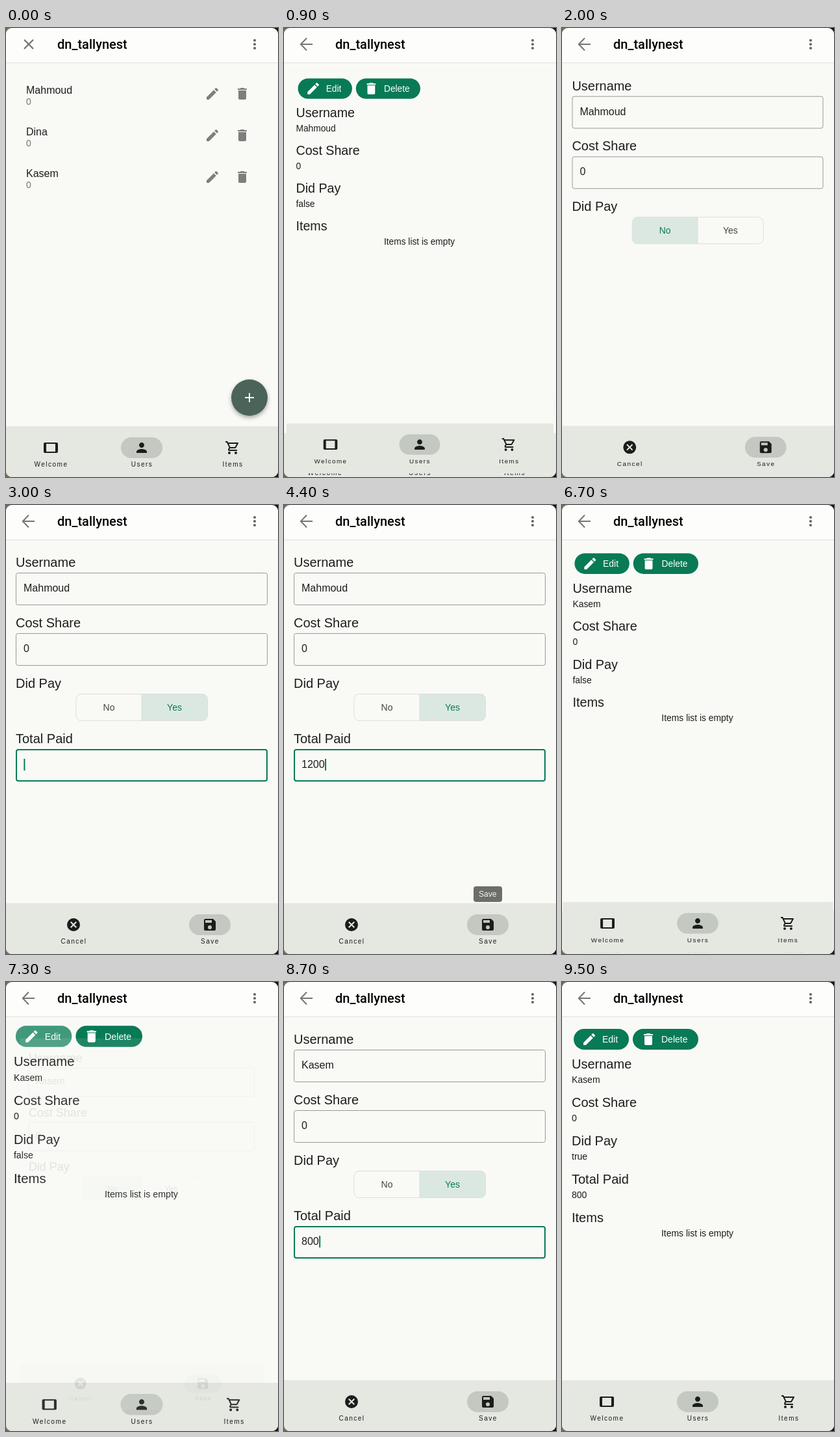
An HTML page that plays this animation: 419 by 690 pixels, repeating every 10 s.

```html
<!DOCTYPE html>
<html lang="en">
<head>
<meta charset="utf-8">
<title>Shared costs</title>
<style>
  html, body { margin: 0; width: 100%; height: 100%; overflow: hidden; background: linear-gradient(90deg, #6d735c, #111); }
  svg { display: block; width: 100%; height: 100%; border-radius: 9px; font-family: "Liberation Sans", Arial, sans-serif; }
</style>
</head>
<body>
<svg id="stage" viewBox="0 0 419 690"></svg>
<script>
const LOOP = 10000, TICK = 100, MOVE = 300;
const PAPER = '#f9faf6', INK = '#1b1d1b', GREEN = '#087a55', GREY = '#7d7f7d';
const TITLE = 'dn_tallynest';
const [FIRST, SECOND, THIRD] = ['Mahmoud', 'Dina', 'Kasem'];

const ICONS = {
  pen: 'M3 17.25V21h3.75L17.81 9.94l-3.75-3.75L3 17.25zM20.71 7.04a1 1 0 000-1.41l-2.34-2.34a1 1 0 00-1.41 0l-1.83 1.83 3.75 3.75 1.83-1.83z',
  bin: 'M6 19c0 1.1.9 2 2 2h8c1.1 0 2-.9 2-2V7H6v12zM19 4h-3.5l-1-1h-5l-1 1H5v2h14V4z',
  tablet: 'M21 4H3C1.9 4 1 4.9 1 6v12c0 1.1.9 2 2 2h18c1.1 0 2-.9 2-2V6c0-1.1-.9-2-2-2zm-2 14H5V6h14v12z',
  person: 'M12 12c2.21 0 4-1.79 4-4s-1.79-4-4-4-4 1.79-4 4 1.79 4 4 4zm0 2c-2.67 0-8 1.34-8 4v2h16v-2c0-2.66-5.33-4-8-4z',
  cart: 'M15.55 13c.75 0 1.41-.41 1.75-1.03l3.58-6.49A1 1 0 0020.01 4H5.21l-.94-2H1v2h2l3.6 7.59-1.35 2.44C4.52 15.37 5.48 17 7 17h12v-2H7l1.1-2h7.45zM6.16 6h12.15l-2.76 5H8.53L6.16 6zM7 18a2 2 0 100 4 2 2 0 000-4zm10 0a2 2 0 100 4 2 2 0 000-4z',
  cancel: 'M12 2a10 10 0 100 20 10 10 0 000-20zm5 13.59L15.59 17 12 13.41 8.41 17 7 15.59 10.59 12 7 8.41 8.41 7 12 10.59 15.59 7 17 8.41 13.41 12z',
  save: 'M17 3H5a2 2 0 00-2 2v14a2 2 0 002 2h14c1.1 0 2-.9 2-2V7l-4-4zm-5 16a3 3 0 110-6 3 3 0 010 6zm3-10H5V5h10v4z'
};

const clamp = x => Math.max(0, Math.min(1, x));
const ramp = (x, a, b) => clamp((x - a) / (b - a));
// Quick rise, then a long settle
const ease = p => p < 1 / 6 ? 0.4 * (6 * p) ** 3.7 : 1 - 0.6 * ((1 - p) * 1.2) ** 4.9;

const text = (x, y, size, str, fill = INK, more = '') =>
  `<text x="${x}" y="${y}" font-size="${size}" fill="${fill}" ${more}>${str}</text>`;
const centred = (x, y, size, str, fill) => text(x, y, size, str, fill, 'text-anchor="middle"');
const rect = (x, y, w, h, r, fill, more = '') =>
  `<rect x="${x}" y="${y}" width="${w}" height="${h}" rx="${r}" fill="${fill}" ${more}/>`;
const icon = (name, cx, cy, fill = INK) =>
  `<path d="${ICONS[name]}" transform="translate(${cx - 12} ${cy - 12})" fill="${fill}"/>`;
const line = (d, stroke, width = 2) =>
  `<path d="${d}" fill="none" stroke="${stroke}" stroke-width="${width}"/>`;

// items: [icon, label, centre x]
function navBar(items, active) {
  return rect(0, 612, 419, 78, 0, '#e5e7e1') + items.map(([name, label, x], i) =>
    (i === active ? rect(x - 32, 629, 64, 32, 16, '#c3c8c1') : '') + icon(name, x, 645) +
    text(x + 0.5, 674, 10, label, INK, 'text-anchor="middle" letter-spacing="1.5"')).join('');
}
const mainNav = () => navBar([['tablet', 'Welcome', 69], ['person', 'Users', 209], ['cart', 'Items', 349]], 1);
const editNav = () => navBar([['cancel', 'Cancel', 104], ['save', 'Save', 314]], 1);

function list() {
  const rows = [FIRST, SECOND, THIRD].map((name, i) => {
    const y = 101 + 64 * i;
    return text(31, y, 16, name) + text(31, y + 17, 14, '0', '#747674') +
      icon('pen', 318, y, GREY) + icon('bin', 364, y, GREY);
  }).join('');
  return rows + mainNav() +
    '<circle cx="375" cy="568" r="28" fill="#4b645a" style="filter:drop-shadow(0 3px 3px #0005)"/>' +
    line('M368 568h14M375 561v14', '#fff');
}

function detail(name, paid, pressed) {
  const button = (x, w, pic, label) => rect(x, 72, w, 32, 16, GREEN) +
    icon(pic, x + 24, 88, '#fff') + text(x + 44, 93, 14, label, '#fff');
  const rows = [['Username', name], ['Cost Share', '0'], ['Did Pay', !!paid]];
  if (paid) rows.push(['Total Paid', paid]);
  const end = 133 + 59 * rows.length;
  return button(18, 85, 'pen', 'Edit') + button(109, 101, 'bin', 'Delete') +
    (pressed ? rect(18, 72, 85, 32, 16, '#fff', 'opacity=".23"') : '') +
    rows.map(([label, value], i) =>
      text(15, 133 + 59 * i, 20, label) + text(15, 155 + 59 * i, 14, value)).join('') +
    text(15, end, 20, 'Items') + centred(208.5, end + 22, 14, 'Items list is empty') + mainNav();
}

function field(y, label, value, focused) {
  const box = focused
    ? rect(16, y + 17, 386, 48, 3, 'none', `stroke="${GREEN}" stroke-width="2"`)
    : rect(15.5, y + 16.5, 387, 49, 3, 'none', 'stroke="#969a96"');
  return text(15, y + 7, 20, label) + box + text(27, y + 45, 16, value);
}

// yes: time of the switch, type: time of the first key
function edit(name, t, yes, type, amount) {
  const on = t >= yes, focused = t >= yes + 200;
  const typed = amount.slice(0, Math.max(0, Math.floor((t - type) / 100) + 1));
  const caret = focused && (t < yes + 700 || t >= type);
  return field(88, 'Username', name) + field(181, 'Cost Share', '0') + text(15, 281, 20, 'Did Pay') +
    `<path d="${on ? 'M209 290.5h93q8 0 8 8v25q0 8-8 8h-93z' : 'M209 290.5h-93q-8 0-8 8v25q0 8 8 8h93z'}" fill="#dbe8e1"/>` +
    rect(108, 290.5, 202.5, 41, 8, 'none', 'stroke="#dcdfda"') + line('M209 291v40', '#dcdfda', 1) +
    centred(158.5, 316, 14, 'No', on ? '#404542' : GREEN) +
    centred(259.5, 316, 14, 'Yes', on ? GREEN : '#404542') +
    (on ? field(359, 'Total Paid', typed, focused) : '') +
    (caret ? rect(27.4 + 8.9 * typed.length, 390, 2, 18, 0, GREEN) : '') + editNav();
}

const scenes = [
  { at: -LOOP, draw: list },
  { at: 780, push: true, draw: t => detail(FIRST, '', t >= 1800) },
  { at: 1820, push: true, draw: t => edit(FIRST, t, 2700, 3600, '1200') },
  { at: 4650, draw: () => detail(FIRST, '1200') },
  { at: 6150, draw: list },
  { at: 6550, push: true, draw: t => detail(THIRD, '', t >= 7200) },
  { at: 7253, push: true, draw: t => edit(THIRD, t, 7600, 8500, '800') },
  { at: 8980, draw: () => detail(THIRD, '800') }
];

const page = (scene, t, scale = 1, alpha = 1) =>
  `<g opacity="${alpha}" transform="translate(209.5 372) scale(${scale}) translate(-209.5 -372)">` +
  rect(0, 54, 419, 636, 0, PAPER) + scene.draw(t) + '</g>';

function body(i, t) {
  const now = scenes[i], p = (t - now.at) / MOVE;
  if (p >= 1) return page(now, t);
  const old = scenes[i - 1], e = ease(p);
  return now.push
    ? page(old, t, 1 + 0.05 * e) + page(now, t, 0.85 + 0.15 * e, ramp(p, 0.145, 0.27))
    : page(now, t, 1.1 - 0.1 * e) + page(old, t, 1 - 0.1 * e, 1 - ramp(p, 0.0825, 0.2075));
}

function appBar(home, hover) {
  return rect(0, 0, 419, 54, 0, '#fdfefc') + rect(0, 53, 419, 1, 0, '#e0e2df') +
    (hover ? '<circle cx="35" cy="25" r="20" fill="#efefed"/>' : '') +
    line(home ? 'M28 18l14 14M42 18L28 32' : 'M44 25H26M35 15.5L25.8 25l9.2 9.5', '#747674', home ? 2.4 : 2) +
    text(79, 32, 20, TITLE, '#000', 'font-family="Roboto, sans-serif" font-weight="500"') +
    [19, 25, 31].map(y => `<circle cx="383" cy="${y}" r="2.1" fill="#666"/>`).join('');
}

function tooltip(t) {
  const alpha = ramp(t, 4050, 4250) * (1 - ramp(t, 4650, 4800));
  return alpha ? `<g opacity="${alpha}">` + rect(292, 586, 44, 24, 4, '#6b6e69') +
    centred(313.7, 602, 12, 'Save', '#f4f5f1') + '</g>' : '';
}

const stage = document.getElementById('stage');
let last = -1;
function frame(ms) {
  const t = Math.floor(ms % LOOP / TICK) * TICK;
  if (t !== last) {
    last = t;
    const i = scenes.findLastIndex(s => s.at <= t);
    stage.innerHTML = body(i, t) + appBar(scenes[i].draw === list, t >= 6100 && t < 6400) + tooltip(t);
  }
  requestAnimationFrame(frame);
}
frame(performance.now());
</script>
</body>
</html>
```
